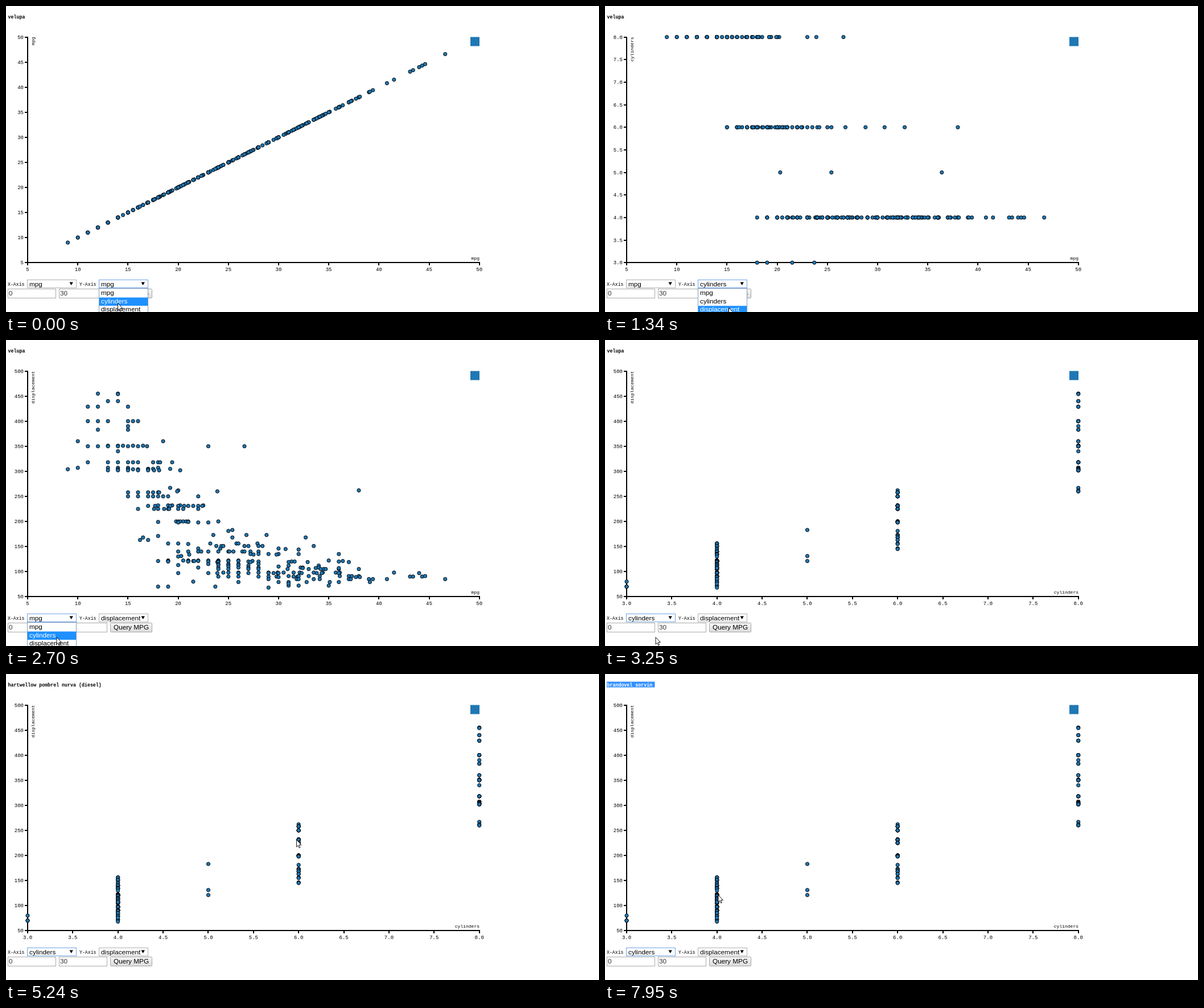
Recreate the animation shown at these times as an HTML page. Size 1042 by 538 pixels, loop 8000 ms.

```html
<!DOCTYPE html>
<html lang="en">
<head>
<meta charset="utf-8">
<title>Car scatter plot</title>
<style>
  html, body { margin: 0; width: 100%; height: 100%; overflow: hidden; background: #fff; }
  svg { display: block; }
  .mono { font-family: "Liberation Mono", monospace; }
  .tick { font-size: 9px; }
  .label { font-size: 8px; }
  .form { font-size: 8.2px; }
  .title { font-size: 8.3px; font-weight: bold; }
  .sans { font: 11.75px "Liberation Sans", sans-serif; }
  .end { text-anchor: end; }
  .mid { text-anchor: middle; }
  .axis { fill: none; stroke: #000; stroke-width: 2; shape-rendering: crispEdges; }
  .dot { fill: #1f77b4; stroke: #000; stroke-width: .95; }
</style>
</head>
<body>
<svg width="1042" height="538" viewBox="0 0 1042 538">
  <defs>
    <linearGradient id="face" x2="0" y2="1">
      <stop stop-color="#f6f6f6"/><stop offset="1" stop-color="#dcdcdc"/>
    </linearGradient>
  </defs>
  <g id="title"></g>
  <g id="plot"></g>
  <g id="form"></g>
  <g id="pointer"></g>
</svg>
<script>
const LOOP = 8000;
const LEFT = 38, RIGHT = 831.7, TOP = 54.6, BOTTOM = 451.2;

const fields = {
  mpg: { min: 5, max: 50, step: 5, digits: 0 },
  cylinders: { min: 3, max: 8, step: .5, digits: 1 },
  displacement: { min: 50, max: 500, step: 50, digits: 0 }
};
const names = Object.keys(fields);

// One call per engine: cylinders, displacement, then the mileages seen with it.
const cars = [];
const engine = (cylinders, displacement, ...miles) =>
  miles.forEach(mpg => cars.push({ mpg, cylinders, displacement }));

engine(8, 455, 12, 14);
engine(8, 454, 14);
engine(8, 440, 13, 14);
engine(8, 429, 11, 12, 15);
engine(8, 400, 11, 12, 13, 15, 15.5, 16);
engine(8, 390, 15);
engine(8, 383, 12, 15);
engine(8, 360, 10, 18.5);
engine(8, 351, 13, 14, 14.5, 15.5, 16.5);
engine(8, 350, 11, 12, 13, 14, 15, 16, 16.9, 23, 26.6);
engine(8, 340, 14);
engine(8, 318, 11, 13, 14, 15, 15.5, 16, 17.5, 18, 18.2, 19.4);
engine(8, 307, 10, 13, 14, 15, 18);
engine(8, 305, 17, 17.5, 19.2);
engine(8, 304, 9, 14, 15, 15.5, 16, 17);
engine(8, 302, 13, 14, 15, 16, 17, 17.6, 18.1, 20.2);
engine(8, 267, 19.2);
engine(8, 262, 20);
engine(8, 260, 19.9, 23.9);

engine(6, 262, 38);
engine(6, 258, 15, 16, 17, 17.5, 18, 18.1);
engine(6, 250, 15, 16, 17, 17.5, 18, 18.5, 19, 22);
engine(6, 232, 18, 19, 19.4, 20.2, 22.5);
engine(6, 231, 17, 17.7, 19.2, 20, 20.6, 21, 21.5, 22, 22.4);
engine(6, 225, 16, 17.6, 18, 18.6, 19, 19.1, 20, 20.5, 22);
engine(6, 200, 19.8, 20, 20.2, 20.5, 20.8, 21, 24);
engine(6, 199, 18, 21);
engine(6, 198, 20, 22, 23);
engine(6, 181, 25);
engine(6, 173, 23.5, 26.8, 28.8);
engine(6, 171, 18);
engine(6, 168, 16.5, 25.4, 32.7);
engine(6, 163, 16.2, 17);
engine(6, 156, 19, 20);
engine(6, 155, 21);
engine(6, 146, 22, 24.2);
engine(6, 145, 30.7);

engine(5, 183, 25.4);
engine(5, 131, 20.3);
engine(5, 121, 36.4);

engine(4, 156, 23.2, 25.8, 26, 27.9);
engine(4, 151, 23.8, 24.3, 24.5, 26.6, 27, 28, 28.4, 33.5);
engine(4, 146, 30);
engine(4, 144, 32);
engine(4, 140, 20, 21, 22, 22.3, 23, 24, 25, 25.1, 25.5, 26.4, 26.6, 27.2, 28);
engine(4, 135, 27.2, 28, 29, 30, 32, 36);
engine(4, 134, 21.1, 27.5, 29.8);
engine(4, 130, 20);
engine(4, 122, 19, 20.5, 21, 22, 23, 24, 25, 26, 35);
engine(4, 121, 18, 19, 21, 21.5, 21.6, 22, 24, 25, 26, 27.4);
engine(4, 120, 19, 21, 23, 24, 27, 28, 31.3, 31.6, 36);
engine(4, 119, 23.9, 24, 27.2, 31, 32.9, 37);
engine(4, 115, 23, 24, 25, 26, 28);
engine(4, 112, 27, 31, 34);
engine(4, 113, 20, 24, 25, 26);
engine(4, 108, 22, 24, 26, 27, 28, 32.2, 32.4, 34);
engine(4, 110, 25, 30);
engine(4, 105, 24, 25, 27, 28, 30.9, 33, 34.2, 34.5, 34.7, 36, 38);
engine(4, 107, 32.4, 33.7, 36);
engine(4, 98, 24.5, 25, 26, 28, 29, 29.9, 30.5, 31.5, 32.1, 33.5, 34.4, 35.7, 36.1, 41.5);
engine(4, 97, 20, 23, 23.9, 26, 27, 29, 29.5, 30, 32.3, 33.8, 34.3, 36, 44);
engine(4, 90, 24, 25, 26, 28, 29, 29.8, 31.5, 31.9, 43.1, 43.4, 44.3);
engine(4, 91, 31, 32, 33, 34.1, 36.1, 37, 37.3, 38, 44.6);
engine(4, 89, 30, 37.7, 38.1);
engine(4, 85, 29, 31.8, 32, 33.5, 34.1, 37, 37.2, 39, 39.4, 40.8, 46.6);
engine(4, 79, 26, 30, 31, 32.8, 35.1, 36, 39.1);
engine(4, 72, 31, 32, 35);
engine(4, 76, 31);
engine(4, 68, 29);

engine(3, 80, 21.5);
engine(3, 70, 18, 19, 23.7);

// Pointer moves: first step, last step, step count, waypoints at even spacing.
const START = [196, 522];
const moves = [
  [120, 1060, 7, [205, 505], [214, 489], [215, 515]],
  [1190, 1340, 2, [217, 530]],
  [1650, 2580, 8, [150, 505], [97, 489], [97, 489], [88, 518]],
  [2700, 2700, 1, [88.5, 522]],
  [3970, 4990, 8, [200, 470], [520, 330], [514, 305], [511, 297]],
  [5120, 6080, 8, [510, 291], [513, 346], [180, 130], [25, 23]],
  [6200, 7120, 7, [25, 23], [25, 23], [50, 150], [95, 400], [113, 481], [112, 430], [112, 386]],
  [7250, 7950, 6, [140, 380], [190, 362], [198.5, 388]]
];

// Hard changes: [from time, value].
const tracks = {
  x: [[0, "mpg"], [3250, "cylinders"]],
  y: [[0, "mpg"], [120, "cylinders"], [1650, "displacement"]],
  title: [[0, "velupa"], [4840, "hartwellow pombrel nurva (diesel)"],
    [5515, "norvek talmeria"], [7660, "brandovel sorvin"]],
  focus: [[0, "y"], [2430, "x"]],
  open: [[0, "y"], [120, ""], [1045, "y"], [1650, ""], [2430, "x"], [3250, ""]],
  hover: [[0, 1], [1340, 2], [2430, 0], [2570, 1]],
  selected: [[0, false], [7660, true]]
};
const at = (track, t) => tracks[track].filter(([from]) => from <= t).pop()[1];

const rect = (x, y, w, h, fill, stroke = "none", rx = 0) =>
  `<rect x="${x}" y="${y}" width="${w}" height="${h}" rx="${rx}" fill="${fill}" stroke="${stroke}"/>`;
const text = (x, y, words, type, fill = "#000", more = "") =>
  `<text x="${x}" y="${y}" class="${type}" fill="${fill}" ${more}>${words}</text>`;

function scale(name, from, to) {
  const { min, max } = fields[name];
  return value => from + (value - min) / (max - min) * (to - from);
}

function ticks(name) {
  const { min, max, step, digits } = fields[name];
  const count = Math.round((max - min) / step);
  return Array.from({ length: count + 1 }, (_, i) => (min + i * step).toFixed(digits));
}

function plot(xName, yName) {
  const x = scale(xName, LEFT, RIGHT), y = scale(yName, BOTTOM, TOP);
  let lines = `M${LEFT},54V452M37,451H833`, words = "";
  for (const v of ticks(xName)) {
    lines += `M${Math.round(x(v))},451V456`;
    words += text(x(v), 466, v, "mono tick mid");
  }
  for (const v of ticks(yName)) {
    lines += `M33,${Math.round(y(v))}H38`;
    words += text(31, y(v) + 3.2, v, "mono tick end");
  }
  words += text(832, 446, xName, "mono label end");
  words += text(0, 0, yName, "mono label end", "#000", 'transform="translate(50 54.5) rotate(-90)"');
  const dots = cars.map(c =>
    `<circle class="dot" cx="${x(c[xName]).toFixed(1)}" cy="${y(c[yName]).toFixed(1)}" r="3.1"/>`);
  return `<path class="axis" d="${lines}"/>${words}${dots.join("")}${rect(816, 54.5, 16, 16, "#1f77b4")}`;
}

function select(x, value, focused) {
  return rect(x + .5, 481.5, 86, 14, "#fff", focused ? "#6fa3e8" : "#b0b0b0") +
    text(x + 4, 492.5, value, "sans") +
    `<path d="M${x + 74.5},485.5h6.4l-3.2,5.5z"/>`;
}

function list(x, hover) {
  return rect(x + .5, 496.5, 86, 46, "#fff", "#7f9db9") + names.map((name, i) => {
    const bar = i === hover ? rect(x + 1, 512.5 + (i - 1) * 14.7, 85, 14.5, "#1e90ff") : "";
    return bar + text(x + 4, 508 + i * 14.7, name, "sans", i === hover ? "#fff" : "#000");
  }).join("");
}

function form(s) {
  const left = { x: 37, y: 163 };
  return text(3, 492, "X-Axis", "mono form") + text(129, 492, "Y-Axis", "mono form") +
    select(left.x, s.x, s.focus === "x") + select(left.y, s.y, s.focus === "y") +
    rect(3.5, 497.5, 84, 16, "#fff", "#aaa") + text(5, 509.3, "0", "sans", "#333") +
    rect(93.5, 497.5, 84, 16, "#fff", "#aaa") + text(95, 509.3, "30", "sans", "#333") +
    rect(183.5, 497.5, 73, 16, "url(#face)", "#a6a6a6", 1) + text(189, 509.3, "Query MPG", "sans") +
    (s.open ? list(left[s.open], s.hover) : "");
}

function title(s) {
  return (s.selected ? rect(3, 13.5, 84.5, 10, "#3390ff") : "") +
    text(3.5, 21.5, s.title, "mono title", s.selected ? "#fff" : "#000");
}

// The pointer was sampled in steps, so it jumps from place to place.
function pointerAt(t) {
  let spot = START;
  for (const [from, to, steps, ...stops] of moves) {
    if (t < from) break;
    const gap = (to - from) / (steps - 1) || 1;
    const done = Math.min(steps, Math.floor((t - from) / gap + .15) + 1) / steps;
    const route = [spot, ...stops], place = done * stops.length;
    const i = Math.min(stops.length - 1, Math.floor(place)), part = place - i;
    spot = route[i].map((v, axis) => v + (route[i + 1][axis] - v) * part);
  }
  return spot;
}

function pointer(t) {
  const [x, y] = pointerAt(t);
  const shape = x < 170 && y < 28
    ? '<path d="M-2.5,-5.5h2l.5,.5l.5,-.5h2M0,-5V5.5M-2.5,6h2l.5,-.5l.5,.5h2" fill="none" stroke="#000"/>'
    : '<path d="M.5,.5V13L3.3,10.4L5.2,14.8L7,14L5.1,9.6H8.9Z" fill="#fff" stroke="#000" stroke-width=".9"/>';
  return `<g transform="translate(${x.toFixed(1)} ${y.toFixed(1)})">${shape}</g>`;
}

const shown = {};
function put(id, key, make) {
  if (shown[id] === key) return;
  shown[id] = key;
  document.getElementById(id).innerHTML = make();
}

function render(t) {
  const s = {};
  for (const track in tracks) s[track] = at(track, t);
  put("plot", s.x + s.y, () => plot(s.x, s.y));
  put("title", s.title + s.selected, () => title(s));
  put("form", [s.x, s.y, s.focus, s.open, s.hover].join(), () => form(s));
  put("pointer", pointerAt(t).join(), () => pointer(t));
}

const begin = performance.now();
function tick(now) {
  render(Math.max(0, now - begin) % LOOP);
  requestAnimationFrame(tick);
}
render(0);
requestAnimationFrame(tick);
</script>
</body>
</html>
```
